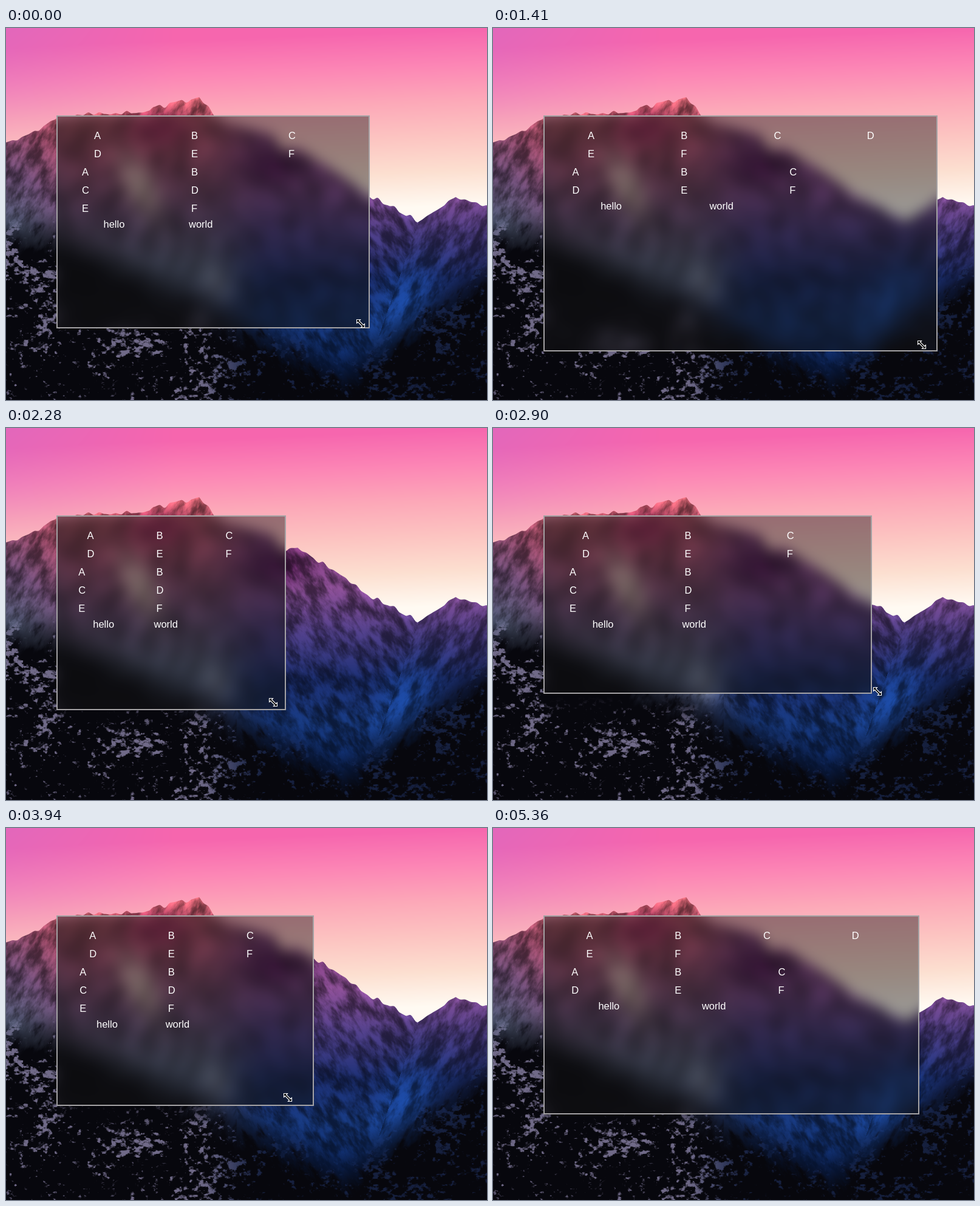
An HTML page with a canvas that plays this animation: 792x613 px, repeating every 5.83 s.

```html
<!DOCTYPE html>
<html lang="en">
<head>
<meta charset="utf-8">
<title>Resizable panel</title>
<style>
html, body { margin: 0; width: 100%; height: 100%; overflow: hidden; background: #08080e; }
canvas { display: block; }
</style>
</head>
<body>
<canvas id="stage" width="792" height="613"></canvas>
<script>
const W = 792, H = 613, LOOP = 5830;
const ctx = document.getElementById('stage').getContext('2d');

const clamp = (v, a, b) => Math.min(b, Math.max(a, v));
const lerp = (a, b, k) => a + (b - a) * k;
const smooth = (a, b, v) => { const k = clamp((v - a) / (b - a), 0, 1); return k * k * (3 - 2 * k); };
const rgb = c => [c >> 16, (c >> 8) & 255, c & 255];
const mix = (a, b, k) => a.map((v, i) => lerp(v, b[i], k));

// ---- wallpaper ----

// Evenly spaced colours from one height to another
function ramp(from, to, ...colors) {
  const stops = colors.map(rgb);
  return y => {
    const p = clamp((y - from) / (to - from), 0, 1) * (stops.length - 1);
    const i = Math.min(Math.floor(p), stops.length - 2);
    return mix(stops[i], stops[i + 1], p - i);
  };
}

const sky = ramp(20, 310, 0xf666ae, 0xfc86b5, 0xfca8b8, 0xfcc4c1, 0xfcdfd0, 0xfffaf2);
const leftRock = ramp(130, 480, 0xb0525e, 0x84405a, 0x5c4062, 0x485068, 0x28304a);
const rightRock = ramp(190, 560, 0x6c3466, 0x6a3c72, 0x3c3068, 0x162458, 0x122c62, 0x0a2050);

const RIDGE = [[0, 187], [45, 170], [85, 143], [190, 141], [262, 127], [318, 114], [344, 145],
  [435, 176], [457, 199], [480, 195], [600, 276], [677, 317], [740, 277], [793, 293]];

// Soft patches: x, y, radius, stretch, slant, colour
const PATCHES = [
  [220, 260, 24, 2, 0.4, 0xd8bcb0],
  [345, 416, 22, 1.3, 0.2, 0x78809a],
  [440, 228, 48, 0.6, 0, 0x400e40],
  [250, 165, 60, 0.5, 0, 0x781c44],
  [650, 460, 45, 1.6, -0.4, 0x163c84]
].map(p => [...p.slice(0, 5), rgb(p[5])]);

function ridgeAt(x) {
  const i = RIDGE.findIndex(p => p[0] > x), [x0, y0] = RIDGE[i - 1], [x1, y1] = RIDGE[i];
  return lerp(y0, y1, (x - x0) / (x1 - x0)) + (noise(x / 9, 3) - 0.5) * 8;
}

const treelineAt = x => Math.min(335 + Math.max(0, x - 85) * 0.5, 565 - (x - 560) * 0.72);

function hash(x, y) {
  let h = Math.imul(x, 374761393) ^ Math.imul(y, 668265263);
  h = Math.imul(h ^ (h >>> 13), 1274126177);
  return ((h ^ (h >>> 16)) >>> 0) / 4294967296;
}

function noise(x, y) {
  const i = Math.floor(x), j = Math.floor(y);
  const u = smooth(0, 1, x - i), v = smooth(0, 1, y - j);
  return lerp(lerp(hash(i, j), hash(i + 1, j), u), lerp(hash(i, j + 1), hash(i + 1, j + 1), u), v);
}

function fractal(x, y, octaves) {
  let sum = 0, amp = 1, total = 0;
  for (let i = 0; i < octaves; i++) {
    sum += amp * noise(x, y);
    total += amp;
    x = x * 2.03 + 17;
    y = y * 2.03 + 31;
    amp *= 0.6;
  }
  return sum / total;
}

function skyColor(x, y) {
  const left = clamp(1 - x / 280, 0, 1) * clamp(1 - y / 200, 0, 1) * 0.5;
  return mix(sky(y + (x - 300) * 0.04), [206, 104, 200], left);
}

function rockColor(x, y, depth) {
  const right = smooth(310, 440, x);
  let c = mix(leftRock(y + 70 * smooth(120, 0, x)), rightRock(y), right);
  for (const [px, py, r, tall, slant, color] of PATCHES) {
    const dy = y - py, dx = x - px - slant * dy;
    c = mix(c, color, 0.85 * Math.exp(-(dx * dx + dy * dy / (tall * tall)) / (r * r)));
  }

  const slope = x < 380 || x > 680 - (y - 317) * 0.35 ? 0.5 : -0.6;
  const n = fractal((x + slope * y) / 13, (y - slope * x) / 30, 4);
  const light = 0.6 + 0.75 * smooth(0.22, 0.78, n) + 0.25 * smooth(14, 0, depth);
  c = c.map(v => v * light);

  const wood = smooth(-30, 40, y - treelineAt(x) + (n - 0.5) * 80);
  if (!wood) return c;
  const open = x < 84 ? 1 : Math.max(smooth(440, 490, y), right);
  const cluster = fractal(x / 55 + 5, y / 40, 2), grain = fractal(x / 8 + 40, y / 6, 3);
  const stone = smooth(0.58, 0.8, grain + (cluster - 0.5) * 0.5) * open * lerp(1, 0.5, right);
  return mix(c, mix([7, 7, 13], mix([112, 106, 136], [36, 56, 112], right), stone), wood);
}

function layer() {
  const c = document.createElement('canvas');
  c.width = W;
  c.height = H;
  return c;
}

function paintWallpaper() {
  const canvas = layer(), g = canvas.getContext('2d'), image = g.createImageData(W, H);
  for (let x = 0; x < W; x++) {
    const ridge = ridgeAt(x);
    for (let y = 0; y < H; y++) {
      const depth = y - ridge;
      let c = depth > 0 ? rockColor(x, y, depth) : skyColor(x, y);
      if (depth > 0 && depth < 1) c = mix(skyColor(x, y), c, depth);
      image.data.set([...c, 255], (y * W + x) * 4);
    }
  }
  g.putImageData(image, 0, 0);
  return canvas;
}

function frost(wall) {
  const canvas = layer(), g = canvas.getContext('2d');
  g.filter = 'blur(11px)';
  g.drawImage(wall, 0, 0);
  g.filter = 'none';
  g.fillStyle = 'rgba(20, 20, 20, 0.43)';
  g.fillRect(0, 0, W, H);
  return canvas;
}

// ---- drag: a smooth path of the panel corner, the pointer runs ahead ----

const LEFT = 84, TOP = 145, STEP = 57, LEAD = 85;
// time, right, bottom
const PATH = [[410, 598, 494], [730, 640, 512], [1410, 728, 531], [2280, 455, 461],
  [2900, 634, 438], [3320, 722, 500], [3940, 488, 453], [4130, 462, 446], [4730, 701, 471]];

function cornerAt(t) {
  const last = PATH.length - 1;
  t = clamp(t, PATH[0][0], PATH[last][0]);
  const i = Math.max(1, PATH.findIndex(p => p[0] >= t)), a = PATH[i - 1], b = PATH[i];
  const span = b[0] - a[0], k = (t - a[0]) / span;
  const slope = (j, d) => j === 0 || j === last ? 0
    : (PATH[j + 1][d] - PATH[j - 1][d]) / (PATH[j + 1][0] - PATH[j - 1][0]) * span;
  return [1, 2].map(d => lerp(a[d], b[d], k * k * (3 - 2 * k))
    + k * (1 - k) * ((1 - k) * slope(i - 1, d) - k * slope(i, d)));
}

// ---- panel ----

function drawGrid(x, gap, cols, y) {
  [...'ABCDEF'].forEach((s, i) => ctx.fillText(s, x + gap * (i % cols), y + 30 * Math.floor(i / cols)));
}

function drawPanel(right, bottom) {
  const w = right - LEFT, h = bottom - TOP;
  ctx.drawImage(frosted, LEFT, TOP, w, h, LEFT, TOP, w, h);
  ctx.strokeStyle = '#a4a2a4';
  ctx.lineWidth = 2;
  ctx.strokeRect(LEFT, TOP, w, h);

  const inner = w - 34, wide = w >= 600;
  ctx.fillStyle = '#fff';
  ctx.font = '16.5px "Liberation Sans", Arial, sans-serif';
  drawGrid(105 + inner / 12, inner / (wide ? 4 : 3), wide ? 4 : 3, 183);
  drawGrid(105 + inner / 24, inner * (wide ? 7 / 24 : 3 / 8), wide ? 3 : 2, 243);
  const y = wide ? 299 : 329;
  ctx.fillText('hello', 100.5 + inner / 8, y);
  ctx.fillText('world', 101 + inner * 5 / 12, y);
}

// ---- pointers ----

const HEAD = [[-4.5, -2.5], [-6.5, -0.5], [-6.5, -6.5], [-0.5, -6.5], [-2.5, -4.5]];
const RESIZE = [...HEAD, ...HEAD.map(([x, y]) => [-x, -y])];
const ARROW = [[0, 0], [0, 15], [3.5, 12], [6, 17.5], [8.5, 16.5], [6, 11], [11, 11]];

function drawPointer(shape, x, y) {
  ctx.beginPath();
  shape.forEach(([a, b]) => ctx.lineTo(x + a, y + b));
  ctx.closePath();
  ctx.fillStyle = '#000';
  ctx.fill();
  ctx.strokeStyle = '#fff';
  ctx.lineWidth = 1.1;
  ctx.stroke();
}

const wall = paintWallpaper(), frosted = frost(wall);

function draw(t) {
  const tick = PATH[0][0] + Math.floor((t - PATH[0][0]) / STEP) * STEP;
  const [right, bottom] = cornerAt(tick).map(Math.round);
  ctx.drawImage(wall, 0, 0);
  drawPanel(right, bottom);
  if (t < 4810) {
    const [x, y] = cornerAt(tick < PATH[0][0] ? tick : tick + LEAD).map(Math.round);
    drawPointer(RESIZE, x - 14, y - 7);
  } else if (t < 5360) {
    const e = smooth(0, 8, Math.floor((t - 4960) / STEP) + 1);
    drawPointer(ARROW, lerp(684, W, e), lerp(461, H, e));
  }
}

const start = performance.now();
function tick() {
  draw((performance.now() - start) % LOOP);
  requestAnimationFrame(tick);
}
tick();
</script>
</body>
</html>
```
